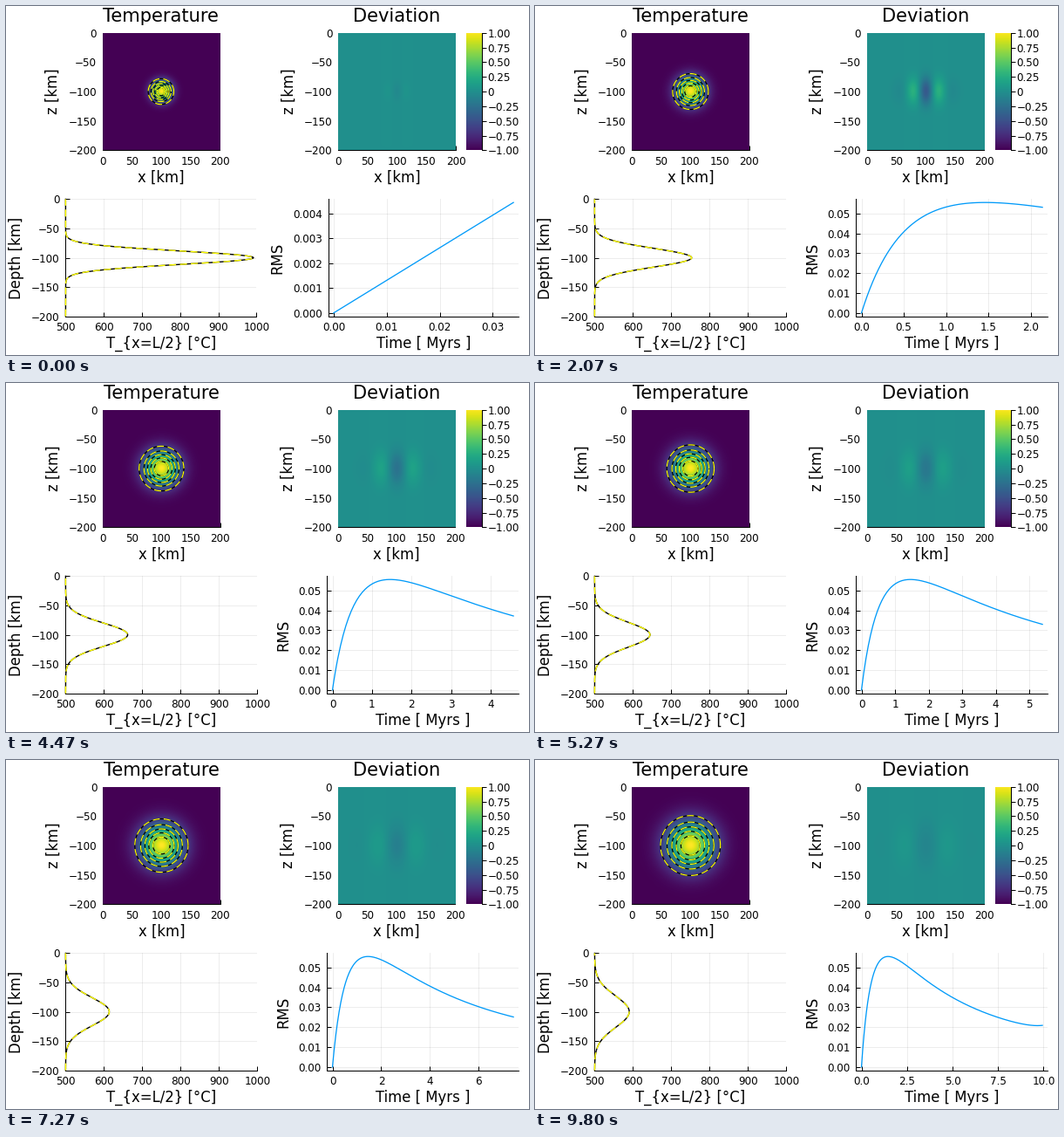
Write a matplotlib script that moves like this. It is 600 px wide and 400 px high and loops after 9870 ms.

```python
import math

import matplotlib.pyplot as plt
import numpy as np
from matplotlib.animation import FuncAnimation

W, H = 600, 400
PX = 0.72                 # points per pixel at 100 dpi
FRAMES, LOOP_MS = 148, 9870
STEPS, T_END = 295, 10.0  # solver steps, Myrs
SIGMA2, TAU = 131.0, 2.19  # initial variance (km^2), diffusion time (Myrs)
SIDE = 134.7
NICE = [(1, 1), (5, 0.9), (2, 0.7), (2.5, 0.5), (3, 0.2)]

plt.rcParams.update({"font.family": "DejaVu Sans", "axes.linewidth": PX})


# ---------- model ----------
def spread(t):
    return 1 + t / TAU


def scheme_rms(t):
    return 0.1364 * t / spread(t) ** 2.5


def total_rms(t):
    edge = 0.0096 * np.exp(0.7 * (t - T_END))
    return np.where(t > 0, np.hypot(scheme_rms(t), edge * (t > 5)), 0)


# ---------- helpers ----------
def place(ax, left, top, right, bottom):
    ax.set_position([left / W, 1 - bottom / H,
                     (right - left) / W, (bottom - top) / H])


def note(ax, text, anchor, dx, dy, size, rotation=0):
    return ax.annotate(text, anchor, xycoords="axes fraction",
                       xytext=(dx * PX, dy * PX), textcoords="offset points",
                       ha="center", va="baseline", rotation=rotation,
                       rotation_mode="anchor", fontsize=size * PX,
                       annotation_clip=False)


def make_axes(xlabel, ylabel, title=None):
    ax = fig.add_axes([0, 0, 1, 1])
    ax.spines[["top", "right"]].set_visible(False)
    ax.set_axisbelow(True)
    ax.tick_params(direction="in", length=5 * PX, width=PX, pad=6.6 * PX,
                   labelsize=12 * PX)
    note(ax, xlabel, (0.5, 0), 0, -36.2, 16.5)
    guide = note(ax, ylabel, (0, 0.5), -51.6, 0, 16.5, 90)
    if title:
        note(ax, title, (0.5, 1), 0, 12.2, 21)
    return ax, guide


def make_map(title, vmin, vmax):
    ax, _ = make_axes("x [km]", "z [km]", title)
    img = ax.imshow(np.zeros((2, 2)), cmap="viridis", vmin=vmin, vmax=vmax,
                    extent=(0, 200, -200, 0), origin="lower", aspect="auto",
                    interpolation="nearest", zorder=1)
    for side in ("left", "bottom"):
        ax.spines[side].set_zorder(0)
    ax.set_xticks(range(0, 201, 50))
    ax.set_yticks(range(-200, 1, 50))
    return ax, img


def make_pair(ax, width):
    """Black solid line with a yellow dashed one on top."""
    solid, = ax.plot([], [], color="black", lw=width * PX, zorder=3)
    dashed, = ax.plot([], [], color="yellow", lw=width * PX, zorder=4,
                      dashes=(8 / width, 4.5 / width), dash_capstyle="butt")
    return solid, dashed


def set_pair(pair, x, y):
    for line in pair:
        line.set_data(x, y)


def nice_ticks(lo, hi):
    """Tick values and number of decimals."""
    span = hi - lo
    best, chosen = -1, None
    top = math.floor(math.log10(span))
    for power in (top, top - 1):
        for q, weight in NICE:
            step = q * 10.0 ** power
            first, last = math.ceil(lo / step), math.floor(hi / step + 1e-9)
            n = last - first + 1
            if not 4 <= n <= 8:
                continue
            score = (0.25 * (1 - abs(n - 5) / 5) + 0.25 * weight
                     + 0.5 * span / ((n - 1) * step))
            if score > best - 1e-9:
                best, chosen = score, (step, first, last)
    step, first, last = chosen
    digits = next(d for d in range(9)
                  if abs(round(step, d) - step) < 1e-6 * step)
    return [k * step for k in range(first, last + 1)], digits


def fit_axis(axis, set_lim, top):
    lo, hi = -0.03 * top, 1.03 * top
    ticks, digits = nice_ticks(lo, hi)
    set_lim(lo, hi)
    axis.set_ticks(ticks, [f"{v:.{digits}f}" for v in ticks])
    return digits


# ---------- figure ----------
fig = plt.figure(figsize=(6, 4), dpi=100, facecolor="white")

temp_ax, temp_img = make_map("Temperature", 0, 1)
rings = [make_pair(temp_ax, 1.2) for _ in range(5)]
dev_ax, dev_img = make_map("Deviation", -1, 1)

bar_ax = fig.add_axes([0, 0, 1, 1])
place(bar_ax, 528, 30.7, 546.3, 30.7 + SIDE)
bar_ax.imshow(np.linspace(-1, 1, 256)[:, None], cmap="viridis",
              extent=(0, 1, -1, 1), origin="lower", aspect="auto")
bar_ax.spines[["top", "left", "bottom"]].set_visible(False)
bar_ax.set_xticks([])
bar_ax.yaxis.tick_right()
bar_ax.tick_params(axis="y", length=5 * PX, width=PX, pad=1.4 * PX,
                   labelsize=12 * PX)
levels = np.linspace(-1, 1, 9)
bar_ax.set_yticks(levels, [f"{v:.2f}".replace("-", "\u2212") if v else "0"
                           for v in levels])

prof_ax, _ = make_axes("T_{x=L/2} [\u00b0C]", "Depth [km]")
prof_ax.set(xlim=(500, 1000), ylim=(-200, 0),
            xticks=range(500, 1001, 100), yticks=range(-200, 1, 50))
profile = make_pair(prof_ax, 1.4)
for line in profile:
    line.set_clip_on(False)

rms_ax, rms_guide = make_axes("Time [ Myrs ]", "RMS")
rms_line, = rms_ax.plot([], [], color="#009AF9", lw=1.3 * PX, zorder=3)

for ax in (prof_ax, rms_ax):
    ax.grid(color="black", alpha=0.1, lw=0.7 * PX)

offset = (np.arange(135) + 0.5) / 135 * 200 - 100
X, Z = np.meshgrid(offset, offset)
depth = np.linspace(-200, 0, 201)
angle = np.linspace(0, 2 * np.pi, 121)


def arrange(digits):
    """Columns narrow slightly when the RMS labels are wide."""
    wide = digits > 2
    right1, left2 = (287.3, 369.7) if wide else (288.3, 368.3)
    place(prof_ax, 68.4, 221.4, right1, 355.6)
    place(rms_ax, left2, 221.4, 588.3, 355.6)
    for ax, mid in ((temp_ax, (68.4 + right1) / 2),
                    (dev_ax, (left2 + 527.5) / 2)):
        place(ax, mid - SIDE / 2, 30.7, mid + SIDE / 2, 30.7 + SIDE)
    label_width = 12 * (0.318 + 0.636 * (1 + digits))
    rms_guide.xyann = (-(18.6 + label_width) * PX, 0)


def update(frame):
    times = T_END / STEPS * np.arange(2 * frame + 2)
    t = times[-1]
    sigma = math.sqrt(SIGMA2 * spread(t))
    bell = np.exp(-(X ** 2 + Z ** 2) / (2 * sigma ** 2))
    temp_img.set_data(bell)

    # The spatial error follows the fourth x-derivative of the Gaussian.
    u2 = (X / sigma) ** 2
    depth_of_dip = scheme_rms(t) * 132.2 / sigma
    dev_img.set_data(-depth_of_dip / 3 * (u2 ** 2 - 6 * u2 + 3) * bell)

    for k, pair in enumerate(rings, 1):
        r = sigma * math.sqrt(2 * math.log(6 / k))
        set_pair(pair, 100 + r * np.cos(angle), -100 + r * np.sin(angle))

    heat = 500 / spread(t) * np.exp(-(depth + 100) ** 2 / (2 * sigma ** 2))
    set_pair(profile, 500 + heat, depth)

    rms = total_rms(times)
    rms_line.set_data(times, rms)
    fit_axis(rms_ax.xaxis, rms_ax.set_xlim, t)
    arrange(fit_axis(rms_ax.yaxis, rms_ax.set_ylim, rms.max()))
    return []


anim = FuncAnimation(fig, update, frames=FRAMES, interval=LOOP_MS / FRAMES,
                     init_func=lambda: [], repeat=True, repeat_delay=0,
                     blit=False)
plt.show()
```
